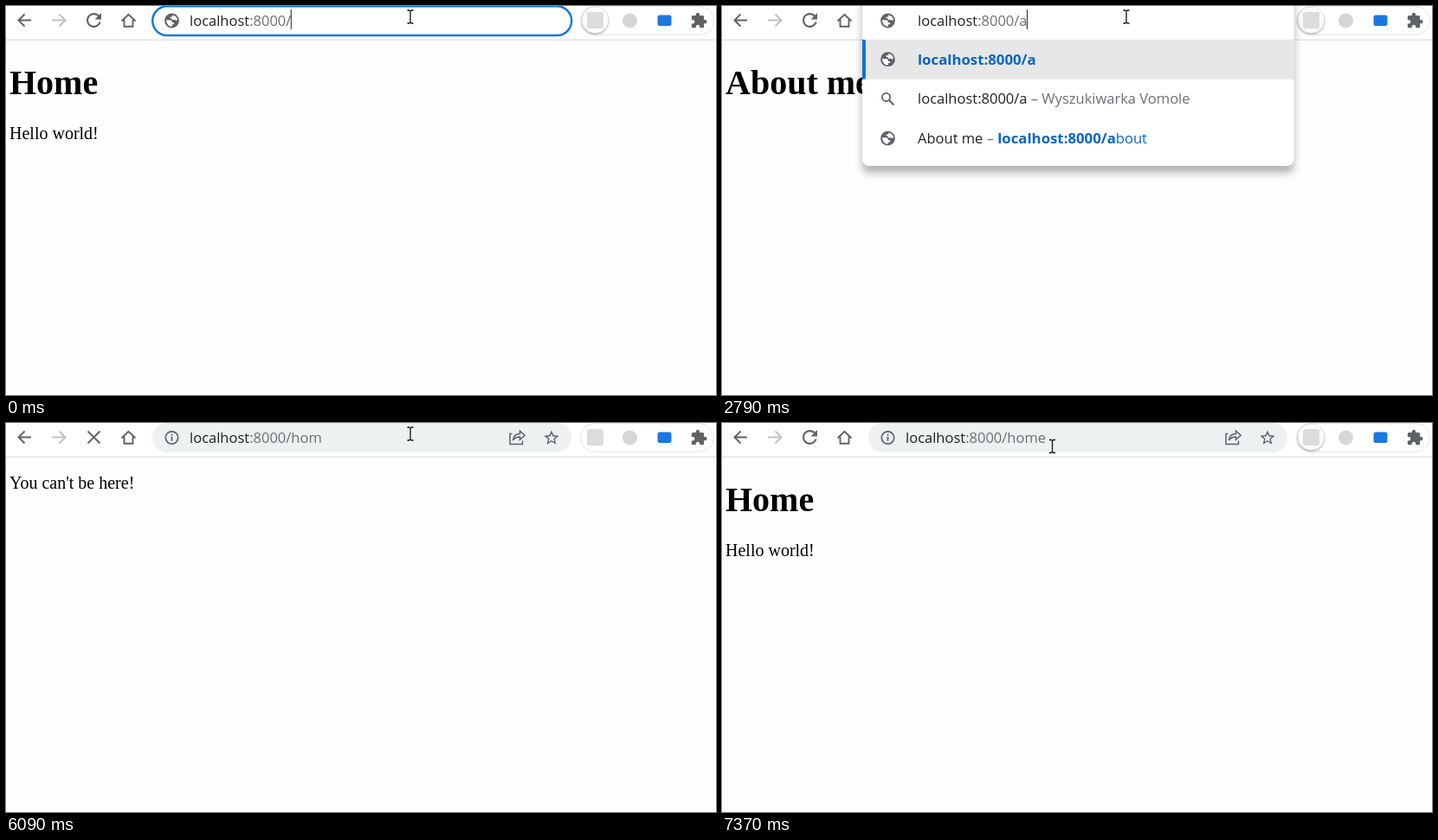
An HTML page for the animation above (7.74 s loop, 820 px wide and 450 px high).

```html
<!DOCTYPE html>
<html lang="pl">
<head>
<meta charset="utf-8">
<title>Routing demo</title>
<style>
  html, body { margin: 0; width: 100%; height: 100%; overflow: hidden; background: #fefefe; }
  svg { display: block; }
  text { white-space: pre; }
  .ui { font: 16.5px "Open Sans", "Noto Sans", sans-serif; fill: #202124; }
  .dim { fill: #6b6f74; }
  .link { fill: #0a66c2; }
  .bold { font-weight: 700; font-size: 16.8px; }
  .serif { font: 20px "Liberation Serif", serif; fill: #000; }
  .serif .h1 { font-size: 40px; font-weight: 700; }
  .icon { fill: #5f6368; }
  .line { fill: none; stroke: #5f6368; stroke-width: 1.9; }
  #drop { filter: drop-shadow(0 8px 5px rgba(0, 0, 0, .3)); }
</style>
</head>
<body>
<svg width="820" height="450" viewBox="0 0 820 450">
  <defs>
    <g id="globe">
      <circle r="8.4"/>
      <path d="M-6.700-.8H-2.500Q.5-.6.5 2.200H2.500V4.300H.3V6.700Q-5.600 6.600-6.700-.8ZM.8-6.600Q5.400-5.600 6.600-1.200 5 .6 3.800-.9H.2V-2.800H-1.800V-4.600H.8Z" fill="#fff"/>
    </g>
    <g id="lens" fill="none" stroke="#5f6368"><circle cx="-2" cy="-2" r="4.6" stroke-width="1.8"/><path d="M1.5 1.5 7 7" stroke-width="2.1"/></g>
    <radialGradient id="paper" gradientUnits="userSpaceOnUse" cx="404" cy="240" r="490" gradientTransform="translate(0 91) scale(1 .62)">
      <stop offset="0" stop-color="#f0e9d0"/><stop offset=".35" stop-color="#ded7bd"/>
      <stop offset=".72" stop-color="#b3ac94"/><stop offset="1" stop-color="#6f6957"/>
    </radialGradient>
    <filter id="soft" x="-20%" y="-20%" width="140%" height="140%"><feGaussianBlur stdDeviation="1.300"/></filter>
    <filter id="glow" x="-30%" y="-30%" width="160%" height="160%"><feGaussianBlur stdDeviation="8"/></filter>
  </defs>

  <rect width="820" height="450" fill="#fefefe"/>
  <g id="pages">
    <g id="home" class="serif"><text class="h1" x="4" y="102">Home</text><text x="4" y="154">Hello world!</text></g>
    <g id="about" class="serif"><text class="h1" x="4" y="102">About me</text></g>
    <g id="denied" class="serif"><text x="4" y="76">You can't be here!</text></g>
    <g id="missing">
      <rect x="4" y="49" width="800" height="394" fill="url(#paper)"/>
      <g fill="none" stroke-width="44" stroke-linejoin="round" stroke-linecap="round" filter="url(#glow)">
        <path d="M201 345V168L102 283H255M632 345V168L542 275 705 266" stroke="#e02a10" opacity=".5"/>
        <path d="M385 171A79 79 0 1 0 475 225" stroke="#2b261e" opacity=".45"/>
      </g>
      <g id="paint" fill="none" filter="url(#soft)"></g>
      <g id="specks" fill="#1f1812" opacity=".85"></g>
    </g>
  </g>

  <rect width="820" height="39" fill="#fff"/>
  <rect y="38.5" width="820" height="1.5" fill="#e2e3e4"/>
  <path class="line" d="M29 16.5H15M21.5 9.5 14.5 16.5l7 7"/>
  <path class="line" d="M53 16.5H68M61.500 9.5l7 7-7 7" style="stroke:#bfc1c3"/>
  <path id="reload" class="icon" transform="translate(101.500 16.5) scale(1.06) translate(-12 -12)" d="M17.65 6.35C16.2 4.9 14.21 4 12 4c-4.42 0-7.99 3.58-7.99 8s3.57 8 7.99 8c3.73 0 6.84-2.55 7.73-6h-2.08c-.82 2.33-3.04 4-5.65 4-3.31 0-6-2.690-6-6s2.69-6 6-6c1.66 0 3.14.69 4.22 1.78L13 11h7V4l-2.35 2.35z"/>
  <path id="stop" class="line" d="m94.500 9.500 14 14m0-14-14 14"/>
  <path class="line" d="m133.500 17.500 8-7.700 8 7.700M136.500 15.500v8.200h10v-8.200"/>

  <rect x="663.5" y=".7" width="154" height="32.500" rx="16.2" fill="#fff" stroke="#e1e3e5"/>
  <circle id="halo" cx="680.5" cy="16.500" r="15" fill="#fbfbfb" style="filter:drop-shadow(0 1px 1.5px rgba(0,0,0,.4))"/>
  <rect x="671" y="7" width="19" height="19" rx="2" fill="#dcdcdc"/>
  <circle cx="720.500" cy="17" r="8.5" fill="#d6d6d6"/>
  <rect x="752.500" y="10.500" width="16" height="12.500" rx="2.500" fill="#1a78e0"/>
  <path class="icon" transform="translate(800.5 16.5) scale(.84) translate(-12.300 -11.500)" d="M20.5 11H19V7c0-1.1-.9-2-2-2h-4V3.5C13 2.12 11.88 1 10.5 1S8 2.12 8 3.5V5H4c-1.1 0-1.99.9-1.99 2v3.8H3.5c1.49 0 2.7 1.21 2.7 2.7s-1.21 2.7-2.7 2.7H2V20c0 1.1.9 2 2 2h3.8v-1.5c0-1.49 1.21-2.7 2.7-2.7 1.49 0 2.7 1.21 2.7 2.7V22H17c1.1 0 2-.9 2-2v-4h1.5c1.38 0 2.5-1.12 2.5-2.5S21.88 11 20.5 11z"/>

  <rect id="pill" x="169" y="0" width="484" height="34" rx="17" fill="#eef1f2"/>
  <rect id="ring" x="169.200" y=".2" width="484" height="33.800" rx="16.900" fill="#fff" stroke="#0f78db" stroke-width="2.400"/>
  <g id="actions">
    <path class="line" style="stroke-width:1.5" d="M584.500 12.500h-2.500V24.500h14.500v-4M585.500 20c.5-5 3.500-7.500 8-7.500V9.200l5.700 5.100-5.700 5.100v-3.400c-3.500 0-6 1-8 4z"/>
    <path class="icon" transform="translate(630 17) scale(.86) translate(-12 -12)" d="M22 9.240l-7.190-.62L12 2 9.19 8.63 2 9.24l5.46 4.73L5.82 21 12 17.27 18.18 21l-1.63-7.03L22 9.24zM12 15.4l-3.760 2.270 1-4.280-3.320-2.880 4.380-.38L12 6.100l1.710 4.040 4.380.380-3.320 2.880 1 4.280L12 15.400z"/>
  </g>

  <g id="drop">
    <rect id="panel" x="162" y="-20" width="498.500" rx="8" fill="#fff"/>
    <rect x="162" y="38.700" width="498.500" height="46" fill="#e7e7e7"/>
    <path d="M162 38.700h2q2 0 2 2v42q0 2-2 2h-2z" fill="#0a73e0"/>
    <g id="rows"></g>
  </g>

  <use id="site" class="icon" href="#globe" x="191.500" y="17"/>
  <g id="info"><circle class="line" cx="191.500" cy="17" r="7.200" style="stroke-width:1.700"/><path class="icon" d="M190.600 15.800h1.800v5h-1.800zM190.600 12.800h1.800v1.800h-1.800z"/></g>
  <text id="url" class="ui" y="22.800"></text>
  <rect id="caret" y="4" width="1.100" height="23" fill="#333"/>
  <path id="mouse" fill="none" stroke="#111" stroke-width="1.300" d="M-3.500-7.500H-1.500L0-6.500 1.500-7.500H3.500M0-6.500V6.500M-3.500 7.500H-1.500L0 6.500 1.500 7.500H3.500"/>
</svg>

<script>
const LOOP = 7740, HOST = 'localhost', PORT = ':8000/';
const $ = id => document.getElementById(id);
const span = (cls, text) => `<tspan class="${cls}">${text}</tspan>`;

// --- painted "404" picture ---
let seed = 7;
const rand = () => (seed = seed * 16807 % 2147483647) / 2147483647;

// Brush stroke of parallel hairs with ragged ends.
function brush(x1, y1, x2, y2, width, color, ragged) {
  const hairs = 48, len = Math.hypot(x2 - x1, y2 - y1), ux = (x2 - x1) / len, uy = (y2 - y1) / len;
  let out = '';
  for (let i = 0; i < hairs; i++) {
    const k = (i + .5) / hairs * 2 - 1, off = k * width / 2, cut = rand() * ragged;
    const start = -Math.sqrt(1 - k * k) * width / 2;
    const ax = x1 - uy * off + ux * start, ay = y1 + ux * off + uy * start;
    const bx = x2 - uy * off - ux * cut, by = y2 + ux * off - uy * cut;
    out += `M${ax} ${ay}L${bx} ${by}`;
  }
  return `<path d="${out}" stroke="${color}" stroke-width="1.500" opacity=".93"/>`;
}

function arc(r, from, to) {
  const at = a => `${398 + r * Math.cos(a * Math.PI / 180)} ${244 + r * Math.sin(a * Math.PI / 180)}`;
  return `M${at(from)}A${r} ${r} 0 ${from - to > 180 ? 1 : 0} 0 ${at(to)}`;
}

function paintPicture() {
  const ink = '#1b1917';
  let art = brush(203, 166, 100, 277, 36, '#c61c08', 4)
    + brush(102, 284, 286, 282, 34, '#c81a08', 48)
    + brush(201, 167, 201, 384, 35, '#cc0800', 52)
    + brush(632, 167, 540, 263, 36, '#dd2c0c', 4)
    + brush(543, 281, 734, 263, 32, '#dc2f10', 52)
    + brush(632, 167, 632, 384, 36, '#d20800', 52);
  art += `<path d="${arc(79, 262, -6)}" stroke="${ink}" stroke-width="46"/>`
    + `<circle cx="385" cy="171" r="23.500" fill="${ink}"/>`;
  for (let r = 57; r < 102; r += .6)
    art += `<path d="${arc(r, 0, -10 - rand() * 58)}" stroke="${ink}" stroke-width="1" opacity=".9"/>`;
  $('paint').innerHTML = art;

  const blob = (x, y, r) => {
    let pts = '';
    for (let a = 0; a < 6.2; a += .45) {
      const q = r * (.82 + rand() * .3);
      pts += `${x + q * Math.cos(a)},${y + q * Math.sin(a)} `;
    }
    return `<polygon points="${pts}"/>`;
  };
  let specks = [[208, 327, 11], [629, 314, 17], [526, 429, 9.5], [405, 226, 4.5], [40, 333, 3],
    [201, 206, 3], [127, 231, 2.500], [733, 264, 2.500]].map(b => blob(...b)).join('');
  for (let i = 0; i < 70; i++)
    specks += `<circle cx="${6 + rand() * 796}" cy="${52 + rand() * 388}" r="${.3 + rand() * .8}" opacity=".7"/>`;
  $('specks').innerHTML = specks;
}

// --- timeline: each step changes part of the state ---
const user = ['Forbidden', 'user'], about = ['About me', 'about'];
const typed = (path, more) => ({ path, drop: 1, caret: 1, edited: 1, ...more });
const blink = caret => ({ caret });
const fade = drop => ({ drop });
const loading = { drop: 0, focus: 0, caret: 0, edited: 0, load: 1, halo: 0 };
const loaded = page => ({ ...loading, load: 0, halo: 1, page });
const focused = { focus: 1, caret: 1 };

const steps = [
  [0, { page: 'home', path: '', focus: 1, caret: 1, edited: 1, drop: 0, load: 0, halo: 1, extra: [], mouse: [467, 12.500] }],
  [180, blink(0)], [350, blink(1)], [540, blink(0)],
  [700, typed('a', { drop: .4 })], [730, fade(.8)], [750, fade(1)], [900, blink(0)],
  [1040, typed('ab')], [1120, typed('abo')], [1200, typed('abou')], [1280, typed('about')], [1450, blink(0)],
  [1600, fade(.7)], [1620, fade(.3)], [1640, loading], [1680, loaded('about')],
  [2180, focused], [2300, blink(0)],
  [2470, typed('abou', { drop: .4, extra: [about] })], [2490, fade(.8)], [2510, fade(1)],
  [2570, typed('abo')], [2680, typed('ab')], [2790, typed('a')], [2940, typed('')], [3090, blink(0)],
  [3310, typed('u', { extra: [] })], [3410, typed('us')], [3510, typed('use')], [3660, blink(0)], [3760, typed('user')],
  [3920, fade(.5)], [3950, { ...loading, halo: 1 }], [3980, loaded('denied')],
  [4710, focused], [4850, blink(0)],
  [5020, typed('use', { drop: .5, extra: [user] })], [5040, fade(1)], [5110, typed('us')], [5210, typed('u')],
  [5310, typed('', { extra: [user, about] })],
  [5480, typed('h', { extra: [] })], [5560, typed('ho')], [5750, blink(0)], [5890, typed('hom')],
  [6050, fade(.7)], [6070, fade(.3)], [6090, loading], [6110, loaded('missing')],
  [6680, { ...focused, mouse: [381.500, 27] }], [6850, blink(0)],
  [6970, typed('home', { drop: .4 })], [6990, fade(.8)], [7010, fade(1)], [7170, blink(0)],
  [7280, fade(.5)], [7320, loading], [7370, loaded('home')]
];

const states = [];
for (const [, change] of steps) states.push({ ...states[states.length - 1], ...change });

function row(i, icon, content) {
  const y = 61.700 + 45.700 * i;
  return `<use class="icon" href="#${icon}" x="191.500" y="${y}"/><text class="ui" x="226" y="${y + 5.800}">${content}</text>`;
}

function render(s) {
  const show = (id, on) => $(id).style.display = on ? '' : 'none';
  for (const page of $('pages').children) show(page.id, page.id === s.page);
  show('reload', !s.load);
  show('stop', s.load);
  show('halo', s.halo);
  show('ring', s.focus);
  show('actions', !s.edited && !s.drop);
  show('site', s.edited);
  show('info', !s.edited);
  show('drop', s.drop);
  show('caret', s.caret);

  const address = HOST + PORT + s.path;
  $('drop').style.opacity = s.drop;
  $('panel').setAttribute('height', 20 + 48 + 45.700 * (2 + s.extra.length));
  $('rows').innerHTML = row(0, 'globe', span('bold link', address))
    + row(1, 'lens', address + span('dim', ' – Wyszukiwarka Vomole'))
    + s.extra.map(([title, path], i) => row(i + 2, 'globe', title + span('dim', ' – ')
      + span('bold link', address) + span('link', path.slice(s.path.length)))).join('');

  const x = s.drop ? 226 : 212, url = $('url');
  url.setAttribute('x', x);
  url.innerHTML = HOST + span('dim', PORT + s.path);
  $('caret').setAttribute('x', x + url.getComputedTextLength() - .6);
  $('mouse').setAttribute('transform', `translate(${s.mouse})`);
}

let current = -1;
function tick() {
  const t = performance.now() % LOOP;
  let i = steps.length - 1;
  while (steps[i][0] > t) i--;
  if (i !== current) render(states[current = i]);
  requestAnimationFrame(tick);
}

paintPicture();
tick();
</script>
</body>
</html>
```
